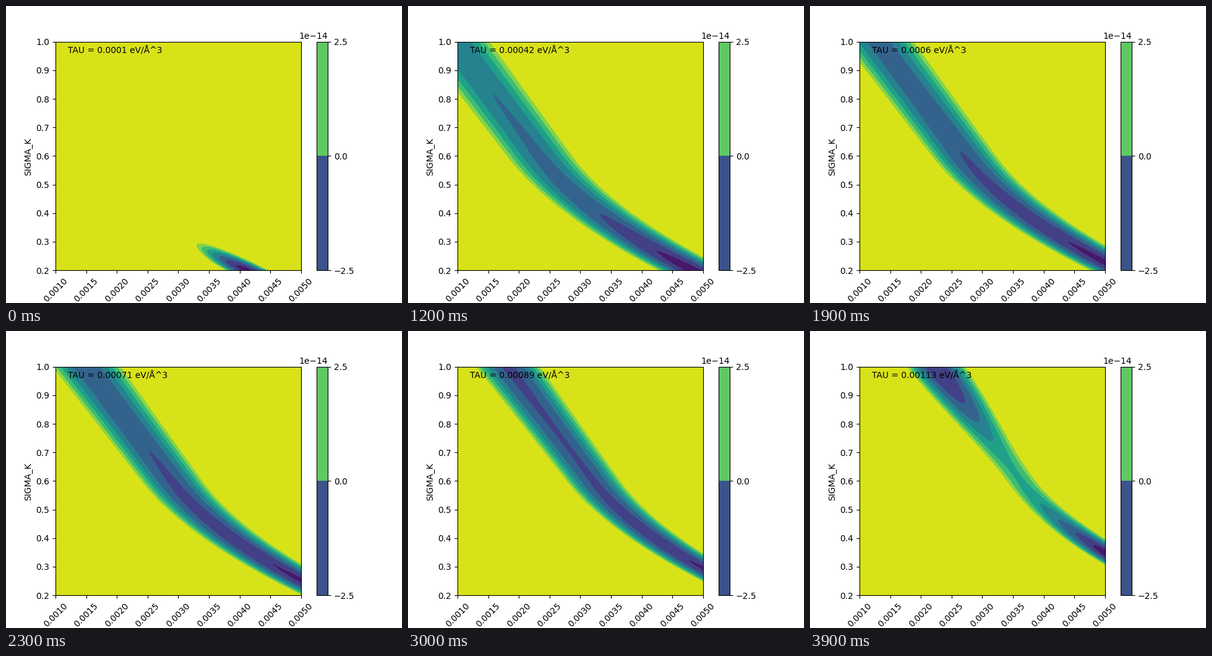
These frames come from a looping animation (640 by 480 pixels, 4000 ms). A matplotlib script:

```python
import numpy as np
import matplotlib.pyplot as plt
from matplotlib.animation import FuncAnimation

FRAMES = 40
TAU_START, TAU_STEP = 1e-4, 2.64e-5

x = np.linspace(0.001, 0.005, 200)
y = np.linspace(0.2, 1.0, 200)[:, None]
u = y - 0.6  # height above the middle of the axis


def center(p):
    """Valley line: straight above the middle, bending right below it."""
    middle = 1.7 + 1.935 * p + 0.06 * np.sin(np.pi * p) ** 2
    return middle - 3.48 * u + (6.45 + 1.7 * p) * np.minimum(u, 0) ** 2


def width(p, step):
    """Half width where the valley has risen by six levels."""
    opening = 1 - 0.48 * np.exp(-step / 2.5)
    return opening * (0.756 - 0.363 * p + 0.222 * u)


def depth(p, step):
    """Valley floor in contour levels, filling early and splitting late."""
    floor = 5.95 + 0.5 * p + (3.2 * p - 3.9) * u + 4 * p * u ** 2
    v = (y - 0.2) / 0.32
    unfilled = 16.9 * np.exp(-step / 4.1) * v ** 2 * np.exp(2 - 2 * v)
    split = p ** 12 * (0.9 + 2.3 * np.cos(2.5 * np.pi * u) + 3.2 * u)
    return floor - unfilled - split


def energy(step):
    p = step / (FRAMES - 1)
    offset = (x * 1000 - center(p)) / width(p, step)
    return -np.clip(depth(p, step) - 6 * offset ** 2, 0.01, 7.99)


fig, ax = plt.subplots(figsize=(6.4, 4.8), dpi=100)
flat = ax.contourf(x, y[:, 0], np.zeros((y.size, x.size)),
                   levels=[-2.5e-14, 0, 2.5e-14])
fig.colorbar(flat, ax=ax)
ax.set_xlim(0.001, 0.005)
ax.set_ylim(0.2, 1.0)
ax.set_ylabel("SIGMA_K", y=0.497)
ax.tick_params(axis="x", rotation=45)
label = ax.text(0.05, 0.95, "", transform=ax.transAxes)


def draw(step):
    for old in list(ax.collections)[1:]:
        old.remove()
    ax.contourf(x, y[:, 0], energy(step), levels=np.arange(-8, 1),
                cmap="viridis")
    label.set_text(f"TAU = {round(TAU_START + TAU_STEP * step, 5)} eV/Å^3")


anim = FuncAnimation(fig, draw, frames=FRAMES, interval=100, repeat=True)
plt.show()
```
